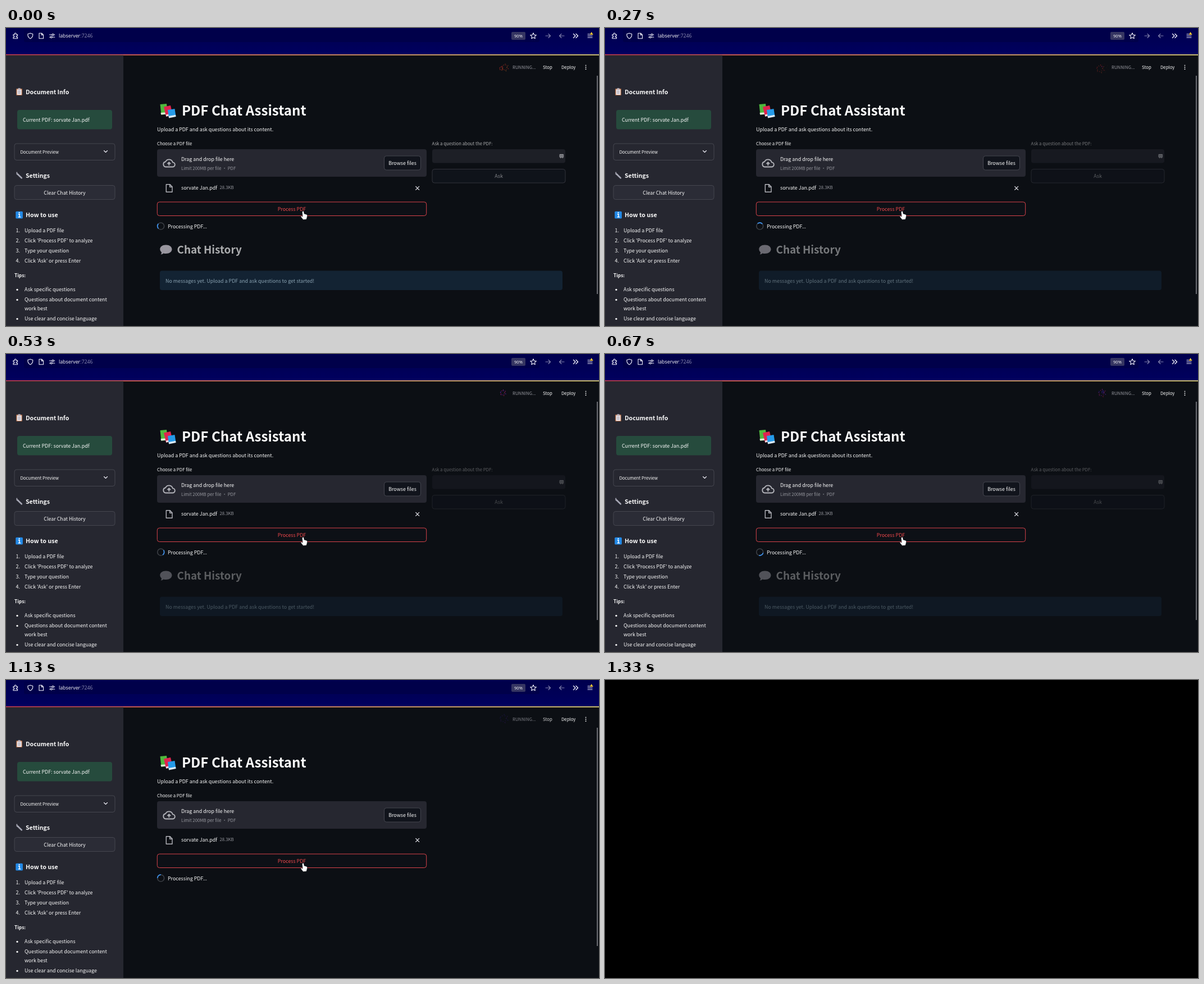
These frames come from a looping animation (1056x531 px, 8 s). An HTML page:

```html
<!DOCTYPE html>
<html lang="en">
<head>
<meta charset="utf-8">
<title>PDF Chat Assistant</title>
<style>
html, body { margin: 0; width: 100%; height: 100%; overflow: hidden; background: #000; }
svg { display: block; width: 1056px; height: 531px; }
text { font: 8.88px "Noto Sans CJK SC", "Noto Sans CJK JP", "Noto Sans CJK", "Noto Sans", sans-serif; fill: #fafafa; white-space: pre; }
.small { font-size: 7.77px; }
.mid { text-anchor: middle; }
.dim { fill: #95969d; }
.head { font-size: 10.6px; font-weight: 700; }
.bar text { font-family: "Open Sans", "Noto Sans", sans-serif; }
.line { fill: none; stroke: #f2f2fa; stroke-width: 1.1; stroke-linecap: round; stroke-linejoin: round; }
.box { stroke: #45464f; stroke-width: 1; }
</style>
</head>
<body>
<svg id="stage" viewBox="0 0 1056 531">
  <defs>
    <linearGradient id="rainbow"><stop stop-color="#f0474f"/><stop offset="1" stop-color="#f3e47d"/></linearGradient>
    <linearGradient id="navy" x2="0" y2="1"><stop stop-color="#00004e"/><stop offset="1" stop-color="#00005f"/></linearGradient>
  </defs>
  <rect width="1056" height="531" fill="#0c0f14"/>

  <!-- browser bar -->
  <g class="bar">
    <rect width="1056" height="48" fill="url(#navy)"/>
    <rect x="32" y="3" width="918" height="22" rx="3" fill="#00004a"/>
    <rect y="47" width="1056" height="1.6" fill="url(#rainbow)"/>
    <g class="line">
      <path d="M13 11.5h2.5q-.8-2.5 1.2-2.5t1.2 2.5h2.6v2.6q-2.2-.6-2.2 1.1t2.2 1.1v2.5H13v-2.4q2 .5 2-1.2t-2-1.1z"/>
      <path d="M43.300 9.200l4.500 1.600q.2 6-4.500 8.200q-4.700-2.200-4.500-8.200z"/>
      <path d="M59 9.200h4.500l3 3v6.600H59zM63.300 9.400v3h3"/>
      <path d="M77.500 12h4.500m3.200 0h1.600M77.500 16.200h1.600m3.200 0h4.500"/>
      <circle cx="83.500" cy="12" r="1.500"/><circle cx="80.700" cy="16.200" r="1.500"/>
      <path d="M939 8.800l1.600 3.400 3.700.4-2.800 2.500.8 3.700-3.300-1.900-3.300 1.900.8-3.700-2.800-2.500 3.700-.4z"/>
      <path stroke="#8585ae" d="M961 14h8.500m-3.500-3.500l3.500 3.500-3.500 3.500M994 14h-8.500m3.500-3.500l-3.500 3.500 3.500 3.500"/>
      <path stroke-width="1.400" d="M1010.500 10.500l3.500 3.500-3.500 3.500m4.500-7l3.500 3.500-3.500 3.500"/>
      <path d="M1036 11h3.500m-3.500 3h8m-8 3h8"/>
    </g>
    <path d="M1042.600 7l3 5h-6z" fill="#ffc935"/>
    <text x="94" y="17.400" style="font-size:8.8px">labserver<tspan fill="#8f8fb2">:7246</tspan></text>
    <rect x="900" y="7" width="25" height="14" rx="2" fill="#363662"/>
    <text class="mid" x="912.500" y="16.800" style="font-size:7.600px">90%</text>
  </g>

  <!-- sidebar -->
  <rect y="48.500" width="209" height="483" fill="#262730"/>
  <g>
    <rect x="18.300" y="108" width="10.500" height="12" rx="1" fill="#b9744c"/>
    <rect x="19.600" y="109.500" width="8" height="9.500" fill="#eee9ef"/>
    <rect x="21.300" y="107" width="4.600" height="2.600" rx="1" fill="#a9a6b4"/>
    <path d="M21 112h5m-5 2.200h5m-5 2.200h5" stroke="#8e8c99" stroke-width=".8"/>
    <text class="head" x="35" y="117.500">Document Info</text>
    <rect x="20" y="146" width="169" height="34.500" rx="4" fill="#264b3d"/>
    <text x="30" y="166.800" fill="#dffde9">Current PDF: sorvate Jan.pdf</text>
    <rect class="box" x="15" y="206" width="179" height="29.500" rx="4" fill="none"/>
    <text class="small" x="25.500" y="224">Document Preview</text>
    <path class="line" d="M174.500 218.500l3 3 3-3"/>
    <path d="M20.500 260.300l7.300 7" stroke="#a7a8b5" stroke-width="2.600" stroke-linecap="round"/>
    <path d="M19 257.600l.6 2.600 2.600.3" transform="rotate(8 20 260)" fill="none" stroke="#a7a8b5" stroke-width="1.900" stroke-linecap="round"/>
    <text class="head" x="35" y="267.400">Settings</text>
    <rect class="box" x="15" y="280.500" width="179" height="25" rx="4" fill="#2b2c36"/>
    <text class="mid" x="104.500" y="296.500">Clear Chat History</text>
    <rect x="17.300" y="326.800" width="12.600" height="12.600" rx="1.500" fill="#2389e6"/>
    <path d="M22 331.700h2v5m-2.200 0h4.400" fill="none" stroke="#fff" stroke-width="1.500"/>
    <circle cx="23.600" cy="329.200" r="1.100" fill="#fff"/>
    <text class="head" x="35" y="337.300">How to use</text>
    <g id="steps"></g>
    <text x="15" y="443.500" style="font-size:8.400px;font-weight:700">Tips:</text>
    <g id="tips"></g>
  </g>

  <!-- run status -->
  <g id="status">
    <g id="sparks"></g>
    <text class="small dim" x="902" y="73.200">RUNNING...</text>
    <text class="small" x="956" y="73.200">Stop</text>
  </g>
  <text class="small" x="989" y="73.200">Deploy</text>
  <path d="M1032.500 66.600v7.500" stroke="#fafafa" stroke-width="1.900" stroke-linecap="round" stroke-dasharray="0 3.300"/>
  <path d="M1053 85v389" stroke="#8f9196" stroke-width="1.500"/>

  <!-- main column -->
  <g>
    <path d="M274.500 136l11.500-1 2.500 18.500-12 1z" fill="#4fb83d"/>
    <path d="M275.500 151l11.500-1 .8 3.600-11.600 1z" fill="#d9ead2"/>
    <path d="M281 140.500l12-2.500 4 17-12 2.700z" fill="#e0234e"/>
    <path d="M284.600 154.500l12-2.700.7 3.200-12 2.700z" fill="#f0d9dd"/>
    <path d="M288 146l12.500-2 2 13.500-12.500 2.300z" fill="#259ae8"/>
    <path d="M289.500 157l12.500-2.300.6 3.300-12.400 2.400z" fill="#dceaf4"/>
    <text x="313" y="155.500" style="font-size:24.150px;font-weight:700">PDF Chat Assistant</text>
    <text x="269" y="184">Upload a PDF and ask questions about its content.</text>
    <text class="small" x="269" y="209.200">Choose a PDF file</text>
    <rect x="269" y="216" width="480" height="49" rx="4" fill="#262730"/>
    <g fill="none" stroke="#b5b6bc" stroke-width="1.900" stroke-linejoin="round">
      <path d="M284.500 247.500a4.700 4.700 0 0 1-.3-9.300a6.800 6.800 0 0 1 12.700 1.200a4 4 0 0 1-.4 8.100z"/>
      <path d="M290.300 245v-5.500m-2.800 2.600l2.800-2.800 2.800 2.800"/>
      <path d="M285.300 278.800h6.700l4 4v9.500h-10.700zM291.700 279v4.200h4.200" stroke-width="1.400"/>
    </g>
    <text x="312" y="237.400">Drag and drop file here</text>
    <text class="small dim" x="312" y="253">Limit 200MB per file • PDF</text>
    <rect class="box" x="673.500" y="228" width="65" height="25" rx="4" fill="#11141c"/>
    <text class="mid" x="706" y="243.800">Browse files</text>
    <text x="312" y="287.600">sorvate Jan.pdf</text>
    <text class="small dim" x="380.500" y="287.400">28.3KB</text>
    <path class="line" stroke-width="1.400" d="M729.700 282.300l6 6m0-6l-6 6"/>
    <rect x="269.300" y="310" width="479.400" height="24.500" rx="4" fill="#0d1016" stroke="#d9434a"/>
    <text class="mid" x="509" y="325.600" fill="#ef484c" style="fill:#ef484c">Process PDF</text>
    <circle cx="275.700" cy="353" r="6" fill="none" stroke="#3a3d43" stroke-width="1.700"/>
    <path id="spinner" d="M271.460 348.760a6 6 0 0 1 8.480 0" fill="none" stroke="#3d8fe8" stroke-width="1.800"/>
    <text x="288" y="356.500">Processing PDF...</text>
  </g>

  <!-- outdated parts that fade -->
  <g id="stale">
    <text class="small" x="758.500" y="209.200">Ask a question about the PDF:</text>
    <rect x="759" y="216" width="237" height="24.500" rx="4" fill="#262730"/>
    <rect x="985.500" y="224.800" width="7.600" height="6" rx="1" fill="#c9c9ce"/>
    <path d="M987 227.800h5" stroke="#262730" stroke-width="1.200" stroke-dasharray="1 .9"/>
    <path d="M987 231.500h1.500m2 0h1.500" stroke="#c9c9ce"/>
    <rect class="box" x="759" y="251.500" width="237" height="24.500" rx="4" fill="#11151e"/>
    <text class="mid" x="877.500" y="267" style="fill:#c0c1c5">Ask</text>
    <path d="M284.800 386.500c6.300 0 10.700 3.300 10.700 7.800s-4.400 7.700-10.700 7.700q-2.300 0-4.300-.6q-2 2-5 2.200q1.600-1.600 1.500-3.800q-2.800-2.200-2.800-5.500c0-4.500 4.400-7.800 10.600-7.800z" fill="#ded9e4"/>
    <text x="304.500" y="402.200" style="font-size:18.900px;font-weight:700">Chat History</text>
    <rect x="274" y="432.500" width="717" height="34.500" rx="4" fill="#172d43"/>
    <text x="284" y="453.500" style="fill:#c7ebff">No messages yet. Upload a PDF and ask questions to get started!</text>
  </g>

  <path d="M527.400 328q.2-2 1.900-1.700q1 .3 1.200 1.700l.6 3 4 1.200q1.600.6 1.500 2.300l-.7 3.600-.9 3-5.900.3-3.700-4.600q-1-1.800.6-2l2.200 1.200z" fill="#fff" stroke="#15171c" stroke-width=".6"/>
</svg>
<script>
const LOOP = 8000, STEP = 200 / 3, CUT = 20;
const $ = id => document.getElementById(id);
const clamp = v => Math.max(0, Math.min(1, v));

const label = (x, y, s) => `<text x="${x}" y="${y}">${s}</text>`;
$('steps').innerHTML = ['Upload a PDF file', "Click 'Process PDF' to analyze", 'Type your question', "Click 'Ask' or press Enter"]
  .map((s, i) => label(17.5, 363.7 + i * 18, i + 1 + '.') + label(33, 363.7 + i * 18, s)).join('');
$('tips').innerHTML = [['Ask specific questions', 469.3], ['Questions about document content', 487.3], ['work best', 503.3], ['Use clear and concise language', 521.3]]
  .map(([s, y], i) => label(33, y, s) + (i == 2 ? '' : `<circle cx="20" cy="${y - 3}" r="1.6" fill="#fafafa"/>`)).join('');

// Firework bursts: start, life, centre, hue, hue spread
const bursts = [
  [-330, 620, 888.5, 70, 12, 28],
  [-150, 600, 882, 72, 5, 20],
  [250, 680, 885, 69, 300, 110],
  [560, 720, 886.5, 68, 255, 30],
];
function burst(t, [start, life, x, y, hue, spread]) {
  const age = (t - start) / life;
  if (age <= 0 || age >= 1) return '';
  const reach = 9 * (1 - (1 - age) ** 2), fade = Math.min(1, 1.8 * (1 - age));
  let out = '';
  for (let i = 0; i < 14; i++) {
    const a = i * 2.4, r = reach * (.55 + .45 * Math.abs(Math.sin(i * 5.3))), tail = r * .72;
    const dx = Math.cos(a), dy = Math.sin(a), sag = age * age * 1.5;
    out += `<path d="M${x + dx * tail} ${y + dy * tail + sag}L${x + dx * r} ${y + dy * r + sag}"
      stroke="hsl(${hue + spread * Math.sin(i * 3.1)} 75% 52%)" stroke-width=".9" opacity="${fade * .85}"/>`;
  }
  return out;
}

function draw(time) {
  const k = Math.floor((time % LOOP + 4) / STEP), t = k * STEP;
  $('stage').style.visibility = k < CUT ? 'visible' : 'hidden';
  if (k >= CUT) return;
  $('stale').setAttribute('opacity', t > 1100 ? 0 : Math.max(.33, .67 - t * .00083));
  $('status').setAttribute('opacity', clamp((1297 - t) / 200));
  $('spinner').setAttribute('transform', `rotate(${268 + t * .36} 275.7 353)`);
  $('sparks').innerHTML = bursts.map(b => burst(t, b)).join('');
}

let begin;
function tick(now) {
  begin ??= now;
  draw(now - begin);
  requestAnimationFrame(tick);
}
draw(0);
requestAnimationFrame(tick);
</script>
</body>
</html>
```
